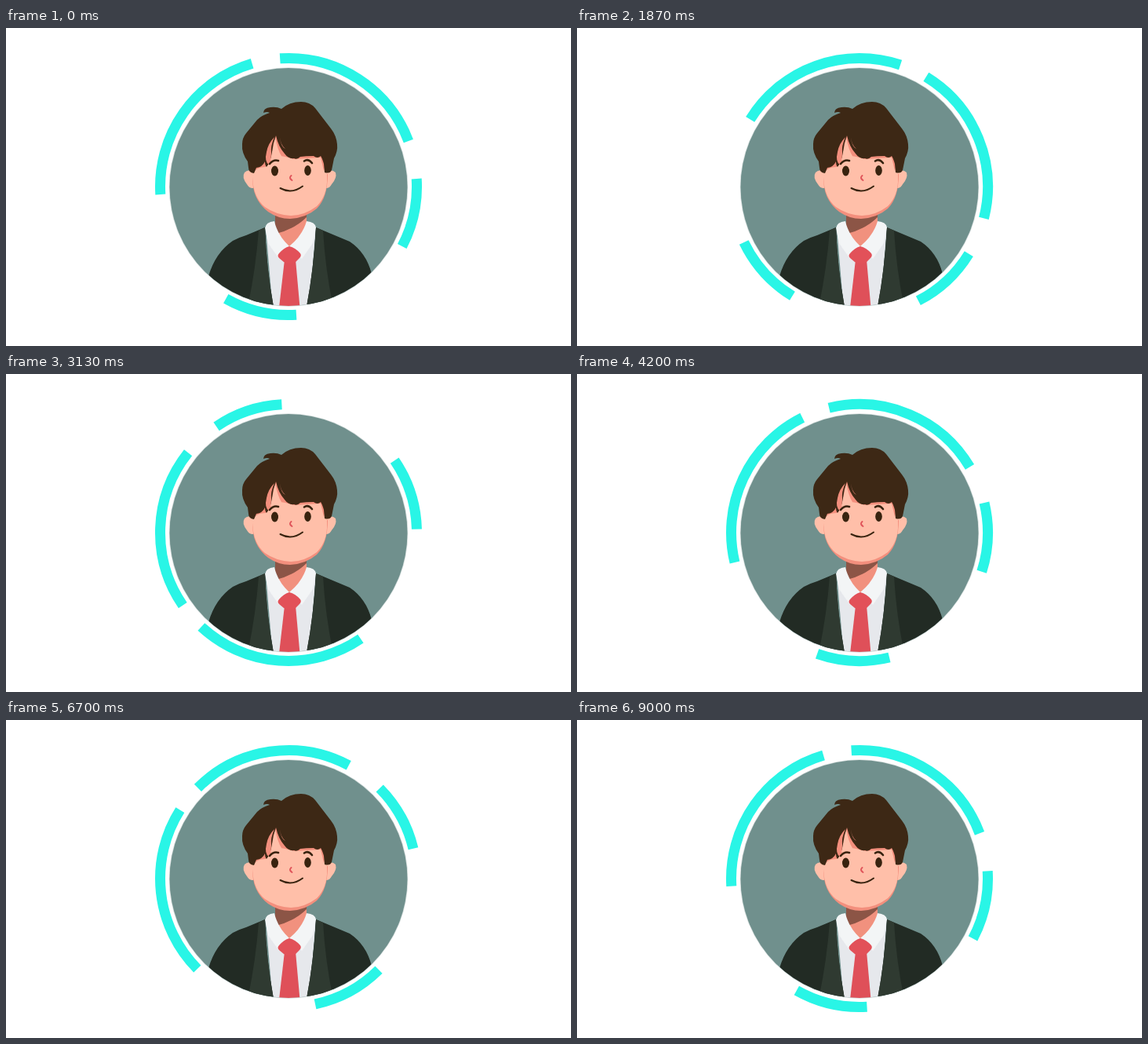
These frames come from a looping animation (720x405 px, 9.03 s). An HTML page:

```html
<!DOCTYPE html>
<html lang="en">
<head>
<meta charset="utf-8">
<title>Avatar ring</title>
<style>
  html, body { margin: 0; width: 100%; height: 100%; overflow: hidden; background: #fff; }
  svg { display: block; width: 100vw; height: 100vh; }
</style>
</head>
<body>
<svg viewBox="0 0 720 405">
  <defs><clipPath id="disc"><circle cx="360" cy="202.5" r="151.5"/></clipPath></defs>

  <circle id="ring" cx="360" cy="202" r="163.5" fill="none" stroke="#29f5e6" stroke-width="13"
    pathLength="360" stroke-dasharray="77 12.7 73 17.3 31.2 58.8 32.7 57.3"/>

  <circle cx="360" cy="202.5" r="152.3" fill="#d5dedd"/>
  <g clip-path="url(#disc)">
    <rect x="200" y="45" width="320" height="315" fill="#70908d"/>

    <!-- neck -->
    <path d="M343 230H383V250L388 268 361 290 336 262 343 250Z" fill="#f1917e"/>
    <path d="M343 234H383V241Q368 256 344 262L340 256 343 248Z" fill="#8c5546"/>

    <!-- shirt -->
    <path d="M331 254 361 279 395 254 386 360H340Z" fill="#e6e8ec"/>
    <path d="M342 246Q331 247 330 255L334 274 348 294 361 278Q346 264 342 246Z" fill="#f3f5f6"/>
    <path d="M383 246Q394 247 395 254L391 274 377 294 361 278Q378 264 383 246Z" fill="#f3f5f6"/>

    <!-- tie -->
    <path d="M355 295H369L374.500 356H348Z" fill="#df5059"/>
    <path d="M361 278Q369 280 375 287 377 290 374 293L369 298Q361 301 354 298L348 293Q345 290 348 287 354 280 361 278Z" fill="#e25159"/>

    <!-- jacket -->
    <path d="M250 360 258 316Q267 286 289 271 296 267 306 264L330 254Q332 310 342 360Z" fill="#222b24"/>
    <path d="M474 360 466 313Q459 286 438 272L395 254Q392 310 382 360Z" fill="#222b24"/>
    <path d="M322 258 330 254Q332 310 342 360H307Q318 310 322 258Z" fill="#2f3a31"/>
    <path d="M404 258 395 254Q392 310 382 360H418Q407 310 404 258Z" fill="#2f3a31"/>

    <!-- face -->
    <path d="M316 183Q309 179 304 184 300 190 307 199 311 206 317 203ZM407 183Q415 179 420 184 422 191 415 199 411 206 406 203Z" fill="#ffbfa9"/>
    <path d="M314 188Q313 218 334 234 347 243 362 243 382 242 396 230 410 216 410 186Z" fill="#f38f7d"/>
    <path d="M315 140H409V190Q410 213 396 227 380 239 363 239 344 238 330 228 315 216 314 190Z" fill="#ffbfa9"/>
    <path d="M316 184Q319 177 331 177L344 162 356 164 367 167 401 165 405 182 412 150 345 130 312 150Z" fill="#f38f7d"/>
    <path d="M343 139Q346 155 351 163L345 165 336 169Q340 155 343 139Z" fill="#ffbfa9"/>

    <!-- hair -->
    <path d="M316 185Q309 184 309 178L308 170Q300 159 301 148 301 140 306 134L320 117Q326 111 336 108 333 106 328 108 328 102 337 101 345 100 351 103 361 94 376 94 387 94 394 102L414 128Q421 137 422 148 423 157 418 166L415 181Q413 186 406 184L405 173Q403 166 401 163 397 167 392 163 382 163 375 164 371 168 367 166 360 167 355 160 347 151 344 137 340 147 339 158 337 171 332 177 330 175 330 170 327 177 319 178Z" fill="#3d2815"/>
    <path d="M335 174Q329 170 332 158 334 147 342 139 337 150 338 159 338 168 335 174ZM349 139Q350 149 356 154 350 151 349 139Z" fill="#f38f7d"/>

    <!-- features -->
    <g fill="#38230f">
      <ellipse cx="342.500" cy="182" rx="4.500" ry="6.500"/>
      <ellipse cx="384.500" cy="181.500" rx="4.300" ry="6.500"/>
    </g>
    <g fill="none" stroke="#38230f" stroke-linecap="round">
      <path d="M336 173Q341 167 347 169M380 169.500Q385 166 390 172" stroke-width="2.600"/>
      <path d="M349.500 204Q364 212 378 201.500" stroke-width="2"/>
    </g>
    <path d="M363.500 188Q360 191 364.500 194" fill="none" stroke="#e0555a" stroke-width="2" stroke-linecap="round"/>
  </g>
</svg>
<script>
  const ring = document.getElementById("ring");
  const LOOP = 9030, FPS = 30, SWING = 136, START = 176.5;

  // One swing as [tick, degrees, degrees per tick]
  const keys = [
    [0, 0, 0], [42, 35, 0], [55, 35, 0], [89, 179, 11.5],
    [94, 240, 10], [126, 350, 1.7], [135, 360, 0]
  ];

  function swing(tick) {
    const i = keys.findIndex(k => k[0] > tick);
    if (i < 0) return 360;
    const [t0, a, va] = keys[i - 1], [t1, b, vb] = keys[i];
    const d = t1 - t0, p = (tick - t0) / d, q = 1 - p;
    return a + (b - a) * p * p * (3 - 2 * p) + d * p * q * (va * q - vb * p);
  }

  function draw(now) {
    const tick = now % LOOP / 1000 * FPS;
    // Turn clockwise, then back with the same easing
    const angle = tick < SWING ? swing(tick) : 360 - swing(tick - SWING);
    ring.setAttribute("transform", `rotate(${START + angle} 360 202)`);
  }

  const begin = performance.now();
  (function loop() {
    draw(performance.now() - begin);
    requestAnimationFrame(loop);
  })();
</script>
</body>
</html>
```
